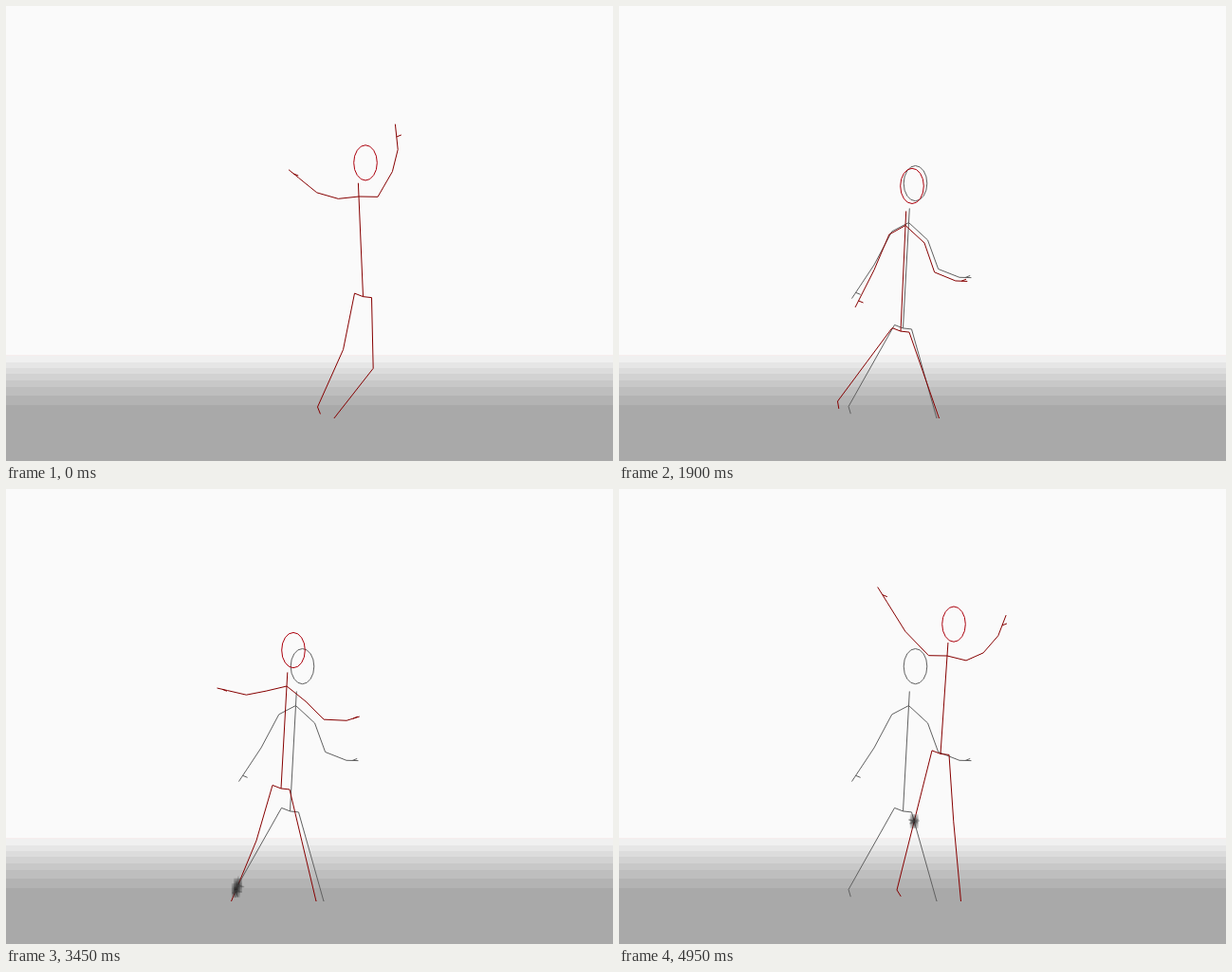
Animation, 640 px wide and 480 px high, one loop 5 s. Source, as an HTML page with a canvas:

```html
<!DOCTYPE html>
<html>
<head>
<meta charset="utf-8">
<style>
  html, body { margin: 0; width: 100%; height: 100%; overflow: hidden; background: #fafafa; }
  canvas { display: block; }
</style>
</head>
<body>
<canvas id="stage" width="640" height="480"></canvas>
<script>
const ctx = document.getElementById('stage').getContext('2d');
const LOOP = 5000, STEP = 50, GHOST_AT = 1800, SPARKS_AT = 2000, FLOOR = 435, HORIZON = 368;

const sin = degrees => Math.sin(degrees * Math.PI / 180);
const cos = degrees => Math.cos(degrees * Math.PI / 180);
const mix = (a, b, f) => [a[0] + (b[0] - a[0]) * f, a[1] + (b[1] - a[1]) * f];
const offset = ([x, y], dx, dy) => [x + dx, y + dy];

// Each key steers the dancer: chest and lean, arm angles, ankles, knee bends.
const keys = [];
const key = (t, ...controls) => keys.push({ t, values: controls.flat() });
const crouch = (t, dx) =>
  key(t, [305.5 + dx, 228.5, -6], [-62, -70], [242 + dx, 422.5], [335 + dx, 435], [0, 0]);

key(0, [372, 201, 4.5], [16, 60], [328.5, 423], [343.5, 438], [6, 21]);
crouch(420, 49);
key(1200, [329, 166, -0.5], [44, 48], [282.5, 415], [333, 432], [2, 3]);
crouch(GHOST_AT, 0);
key(1900, [302, 231.5, -5], [-67, -71], [230.5, 417], [337.5, 435], [0, 0]);
key(2800, [296.5, 163.5, -5], [49, 56], [250, 407], [309, 434], [5, 2]);
key(3450, [296, 208, -6], [-11, -45], [237.5, 435], [327, 435], [3, 0]);
crouch(3800, -3);
key(4200, [313, 206, -10], [-22, -60], [272, 406], [304, 386], [-15, 22]);
key(4950, [346, 176, -7], [46, 24], [293, 423], [360.5, 435], [0, -1]);

// Cubic Hermite between neighbouring keys.
function controlsAt(t) {
  const last = keys.length - 1;
  let i = 0;
  while (i < last - 1 && keys[i + 1].t <= t) i++;
  const a = keys[Math.max(i - 1, 0)], b = keys[i], c = keys[i + 1], d = keys[Math.min(i + 2, last)];
  const span = c.t - b.t, u = (t - b.t) / span, v = 1 - u;
  return b.values.map((from, k) => {
    const to = c.values[k];
    const m0 = (to - a.values[k]) / (c.t - a.t) * span;
    const m1 = (d.values[k] - from) / (d.t - b.t) * span;
    return from * (1 + 2 * u) * v * v + to * u * u * (3 - 2 * u) + m0 * u * v * v - m1 * u * u * v;
  });
}

// Chain of bones, each [length, angle above the horizontal].
function chain(start, side, bones) {
  const points = [start];
  for (const [length, angle] of bones) {
    points.push(offset(points[points.length - 1], side * length * cos(angle), -length * sin(angle)));
  }
  return points;
}

// Arms swing towards the viewer, so they look shortest when level.
function leftArm(chest, angle) {
  const s = sin(angle), fore = angle + 25 * cos(angle) ** 2;
  const length = 33 + 26 * s * s + 12 * s;
  return chain(offset(chest, -14 - 8 * cos(angle), 4 - 6 * s), -1,
    [[16 + 27 * Math.abs(s), angle], [length * 0.65, fore], [length * 0.35, fore]]);
}

function rightArm(chest, angle) {
  const s = sin(angle), fore = angle + 16 + (60 - angle) / 4;
  return chain(offset(chest, 20, 9 - 10 * s), 1,
    [[10 + 24 * Math.abs(s), angle], [24, fore], [20 + 8 * s, fore + 20]]);
}

function leg(hip, ankle, bend) {
  const knee = offset(mix(hip, ankle, 0.46), bend, bend * 0.7);
  const toe = Math.atan2(ankle[1] - knee[1], ankle[0] - knee[0]) - 0.8;
  return [hip, knee, ankle, offset(ankle, 8 * Math.cos(toe), 8 * Math.sin(toe))];
}

function poseAt(t) {
  const [x, y, lean, left, right, lx, ly, rx, ry, bendL, bendR] = controlsAt(t);
  const chest = [x, y], pelvis = [x + lean, y + 107 - 5 * sin(left)];
  return {
    chest, pelvis,
    head: offset(chest, 7, 5 * sin(left) - 37),
    arms: [leftArm(chest, left), rightArm(chest, right)],
    legs: [leg(offset(pelvis, -9, -3.5), [lx, ly], bendL), leg(offset(pelvis, 9, 1), [rx, ry], bendR)],
  };
}

function line(points) {
  ctx.beginPath();
  points.forEach(([x, y]) => ctx.lineTo(x, y));
  ctx.stroke();
}

function drawFigure({ head, chest, pelvis, arms, legs }, color, headColor) {
  ctx.lineWidth = 1;
  ctx.strokeStyle = color;
  line([mix(pelvis, chest, 1.135), pelvis]);
  arms.forEach((arm, i) => {
    line([chest, ...arm]);
    const palm = mix(arm[2], arm[3], 0.5);
    line([palm, offset(palm, 5, i ? -2 : 2)]);
  });
  for (const points of legs) line([pelvis, ...points]);
  ctx.strokeStyle = headColor;
  ctx.beginPath();
  ctx.ellipse(...head, 12.3, 18.6, 0, 0, 7);
  ctx.stroke();
}

const bones = pose => pose.legs.flatMap(p => p.slice(1).map((end, i) => [p[i], end]));

function crossing([a, b], [c, d]) {
  const rx = b[0] - a[0], ry = b[1] - a[1], sx = d[0] - c[0], sy = d[1] - c[1];
  const det = rx * sy - ry * sx, qx = c[0] - a[0], qy = c[1] - a[1];
  const u = (qx * sy - qy * sx) / det, v = (qx * ry - qy * rx) / det;
  return u >= 0 && u <= 1 && v >= 0 && v <= 1 ? mix(a, b, u) : null;
}

function drawBurst([x, y], seed) {
  const random = () => (seed = (seed * 16807 + 11) % 2147483647) / 2147483647;
  ctx.save();
  ctx.translate(x, y);
  ctx.scale(1, 1.5);
  const glow = ctx.createRadialGradient(0, 0, 0, 0, 0, 7);
  glow.addColorStop(0, 'rgba(0,0,0,.85)');
  glow.addColorStop(0.4, 'rgba(50,50,50,.55)');
  glow.addColorStop(1, 'rgba(90,90,90,.1)');
  ctx.fillStyle = glow;
  ctx.fillRect(-4.5, -5, 9, 10);
  ctx.strokeStyle = 'rgba(70,70,70,.35)';
  for (let i = 0; i < 10; i++) {
    const angle = random() * 360, r = 3 + random() * 4;
    line([[0, 0], [cos(angle) * r, sin(angle) * r]]);
  }
  ctx.restore();
}

function fillBelow(y, color) {
  ctx.fillStyle = color;
  ctx.fillRect(0, y, 640, 480 - y);
}

function drawRoom() {
  fillBelow(0, '#fafafa');
  fillBelow(HORIZON, '#f6eeee');
  [1, 8, 14, 20, 27, 34, 43, 53].forEach((depth, i) => {
    const shade = 240 - 10.1 * i;
    fillBelow(HORIZON + depth, `rgb(${shade},${shade},${shade})`);
  });
}

const ghost = poseAt(GHOST_AT);

function draw(t) {
  drawRoom();
  const dancer = poseAt(t);
  ctx.save();
  ctx.beginPath();
  ctx.rect(0, 0, 640, FLOOR);
  ctx.clip();
  if (t >= GHOST_AT) drawFigure(ghost, '#606060', '#606060');
  drawFigure(dancer, '#860000', '#ac000c');
  if (t >= SPARKS_AT) {
    for (const bone of bones(dancer)) {
      for (const other of bones(ghost)) {
        const hit = crossing(bone, other);
        if (hit) drawBurst(hit, t + 1);
      }
    }
  }
  ctx.restore();
}

function tick() {
  draw(Math.floor(performance.now() % LOOP / STEP) * STEP);
  requestAnimationFrame(tick);
}
tick();
</script>
</body>
</html>
```
